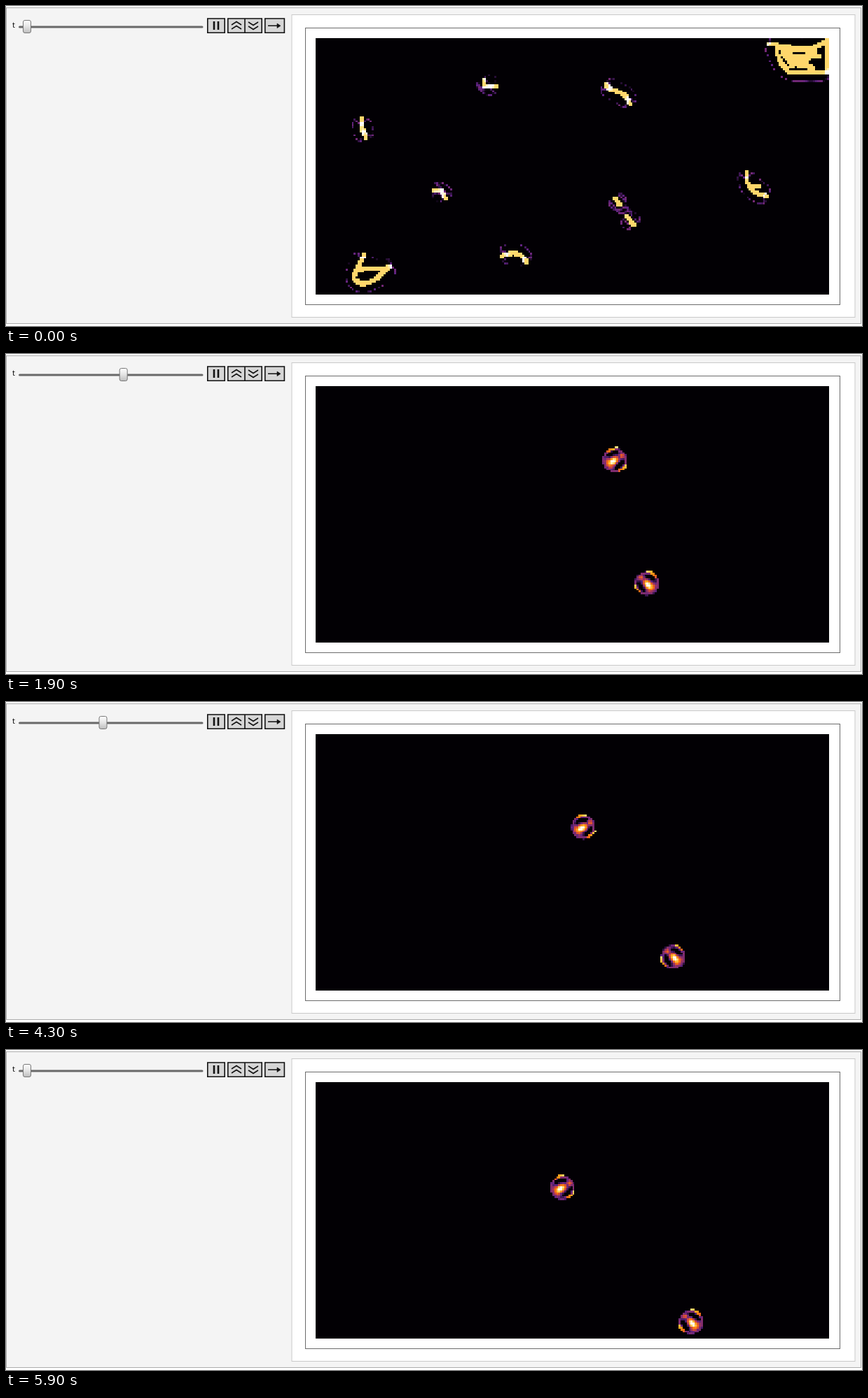
Animation of 1222 by 458 pixels, one loop 6000 ms. Source, as an HTML page with a canvas:

```html
<!DOCTYPE html>
<html lang="en">
<head>
<meta charset="utf-8">
<title>Cell automaton</title>
<style>
  html, body { margin: 0; width: 100%; height: 100%; overflow: hidden; background: #fff; }
  svg, canvas { position: absolute; display: block; }
  svg { left: 0; top: 0; }
  canvas { left: 442px; top: 46px; width: 733px; height: 367px; image-rendering: pixelated; background: #020004; }
</style>
</head>
<body>
<svg width="1222" height="458" viewBox="0 0 1222 458">
  <defs>
    <linearGradient id="knobFill" x2="0" y2="1">
      <stop stop-color="#fff"/><stop offset=".5" stop-color="#e4e4e4"/><stop offset="1" stop-color="#bdbdbd"/>
    </linearGradient>
  </defs>
  <rect x=".5" y="2.5" width="1220" height="452" fill="#f4f4f4" stroke="#adadad"/>
  <rect x="408" y="12.5" width="804" height="433" fill="#fff" stroke="#c9c9c9"/>
  <rect x="427.5" y="31.5" width="763" height="396" fill="#fff" stroke="#6b6b6b"/>
  <text x="9" y="31" font-family="'Open Sans', sans-serif" font-size="11">t</text>
  <path d="M19.5 30H280" stroke="#696969" stroke-width="3" stroke-linecap="round"/>
  <g fill="#d6d6d6" stroke="#111" stroke-width="1.6">
    <path d="M287.8 18H312.2V38.2H287.8ZM316.8 18H365.2V38.2H316.8ZM341 18V38.2M369.8 18H397.4V38.2H369.8Z"/>
    <path d="M297 22V34M303 22V34" stroke-width="2.6"/>
    <path fill="none" stroke-width="1.5" d="M322 27l7-4.5 7 4.5M322 33l7-4.5 7 4.5M346 23l7 4.5 7-4.5M346 29l7 4.5 7-4.5M374 28.3H390"/>
    <path d="M387 25l5 3.3-5 3.3z" fill="#111" stroke-width=".6"/>
  </g>
  <rect id="knob" x="-5.5" y="20.5" width="11" height="18" rx="2.5" fill="url(#knobFill)" stroke="#777"/>
</svg>
<canvas id="world" width="256" height="128"></canvas>
<script>
const W = 256, H = 128, LEFT = 442, TOP = 46, CELL = 733 / W;
const LOOP = 6000, STEP = 100;
const ctx = document.getElementById('world').getContext('2d');
const image = ctx.createImageData(W, H);
const knob = document.getElementById('knob');

const stops = [[2, 0, 4], [95, 35, 129], [201, 66, 69], [250, 115, 13], [255, 174, 33], [255, 225, 125], [255, 255, 255]];
const palette = Array.from({ length: 256 }, (_, i) => {
  const p = i / 255 * 6, k = Math.min(5, Math.floor(p));
  return stops[k].map((c, j) => c + (stops[k + 1][j] - c) * (p - k));
});

const ramp = (t, a, b) => {
  const p = Math.max(0, Math.min(1, (t - a) / (b - a)));
  return p * p * (3 - 2 * p);
};

function put(grid, col, row, v) {
  if (col < 0 || row < 0 || col >= W || row >= H) return;
  const i = row * W + col;
  if (v > grid[i]) grid[i] = v;
}

// Hand-drawn strokes from which the colonies grow.
const strokes = [
  'M509 161V176L514 189',
  'M682 106V113L690 116L701 114',
  'M612 264H622L628 276',
  'M857 113L863 120Q886 122 891 142',
  'M869 274L877 284M885 300L897 313',
  'M1058 239V252Q1066 270 1086 271M1062 257H1075',
  'M707 358Q734 346 742 366',
  'M511 356L496 388Q512 412 547 371M506 378Q522 372 540 377'
];

// A bowl filled with seeded random chords.
function scribble() {
  let seed = 7;
  const random = () => (seed = seed * 16807 % 2147483647) / 2147483647;
  const inBowl = () => {
    const a = random() * Math.PI, r = 36 * Math.sqrt(random());
    return `${1136 + r * Math.cos(a)} ${61 + r * Math.sin(a)}`;
  };
  let d = 'M1088 55H1100Q1100 80 1120 96H1172V50L1158 58Q1125 70 1102 58';
  for (let i = 0; i < 14; i++) d += `Q${inBowl()} ${inBowl()}`;
  return d;
}

function sow(grid, d) {
  const path = document.createElementNS('http://www.w3.org/2000/svg', 'path');
  path.setAttribute('d', d);
  const length = path.getTotalLength();
  for (let s = 0; s <= length; s += 1.2) {
    const p = path.getPointAtLength(s);
    const c = Math.round((p.x - LEFT) / CELL) - 1, r = Math.round((p.y - TOP) / CELL) - 1;
    for (let k = 0; k < 4; k++) put(grid, c + (k & 1), r + (k >> 1), 1);
  }
}

// Continuous cellular automaton: ring kernel, narrow bell of growth.
const RADIUS = 8, MU = .15, SIGMA = .015, DT = .2;
const kernel = [];
for (let dy = -RADIUS; dy <= RADIUS; dy++)
  for (let dx = -RADIUS; dx <= RADIUS; dx++) {
    const r = Math.hypot(dx, dy) / RADIUS;
    if (r > 0 && r < 1) kernel.push({ dx, dy, w: Math.exp(4 - 1 / (r * (1 - r))) });
  }
const total = kernel.reduce((sum, k) => sum + k.w, 0);

function evolve(grid) {
  const potential = new Float32Array(W * H);
  grid.forEach((v, i) => {
    if (!v) return;
    const col = i % W, row = (i - col) / W;
    for (const { dx, dy, w } of kernel) {
      const c = col + dx, r = row + dy;
      if (c >= 0 && c < W && r >= 0 && r < H) potential[r * W + c] += v * w / total;
    }
  });
  return grid.map((v, i) => {
    const growth = 2 * Math.exp(-(((potential[i] - MU) / SIGMA) ** 2) / 2) - 1;
    return Math.max(0, Math.min(1, v + DT * growth));
  });
}

const seeds = new Float32Array(W * H);
[...strokes, scribble()].forEach(d => sow(seeds, d));
const history = [evolve(seeds)];
while (history.length < 14) history.push(evolve(evolve(history[history.length - 1])));

const bump = (u, n, u0, su, sn) => Math.exp(-(((u - u0) / su) ** 2) - (n / sn) ** 2);

// A glider in its own frame: u points ahead, n to the side.
function drawGlider(grid, x, y, heading, life) {
  const ux = Math.cos(heading), uy = Math.sin(heading), reach = 24;
  const c0 = Math.floor((x - reach - LEFT) / CELL), r0 = Math.floor((y - reach - TOP) / CELL);
  const size = Math.ceil(2 * reach / CELL);
  for (let row = r0; row <= r0 + size; row++)
    for (let col = c0; col <= c0 + size; col++) {
      const dx = LEFT + (col + .5) * CELL - x, dy = TOP + (row + .5) * CELL - y;
      const u = dx * ux + dy * uy, n = Math.abs(dx * uy - dy * ux);
      let v = .22 * Math.exp(-(((Math.hypot(u, n) - 15.5) / 1.9) ** 4));
      const wing = 16 - Math.max(0, u * u / 40 - 1);
      if (u < 3 && u > -13 && Math.abs(n - wing) < 1.5) v = .4 + .45 * (3 - u) / 16;
      v = Math.max(v, .6 * bump(u, n, 9, 5, 8), 1.12 * bump(u, n, 3, 8.5, 4.8), .45 * bump(u, n, -12, 4.5, 4.5));
      if (v > .08) put(grid, col, row, Math.min(1, v) * life);
    }
}

function render(t) {
  knob.setAttribute('transform', `translate(${30 + Math.max(0, Math.min(t, 5900 - t) - 485) * .0973} 0)`);
  const rest = 1 - ramp(t, 700, 1300);
  const grid = rest ? history[t / STEP].map(v => v * rest) : new Float32Array(W * H);
  const life = ramp(t, 600, 1000);
  if (life) {
    drawGlider(grid, 904.6 - .01875 * t, 130.6 + .01125 * t, 2.6, life);
    drawGlider(grid, 885 + .01575 * t, 299 + .01525 * t, .77, life);
  }
  grid.forEach((v, i) => {
    const [r, g, b] = palette[Math.round(v * 255)];
    image.data.set([r, g, b, 255], i * 4);
  });
  ctx.putImageData(image, 0, 0);
}

const start = performance.now();
let shown = -1;
function tick() {
  const t = Math.floor((performance.now() - start) % LOOP / STEP) * STEP;
  if (t !== shown) render(shown = t);
  requestAnimationFrame(tick);
}
tick();
</script>
</body>
</html>
```
